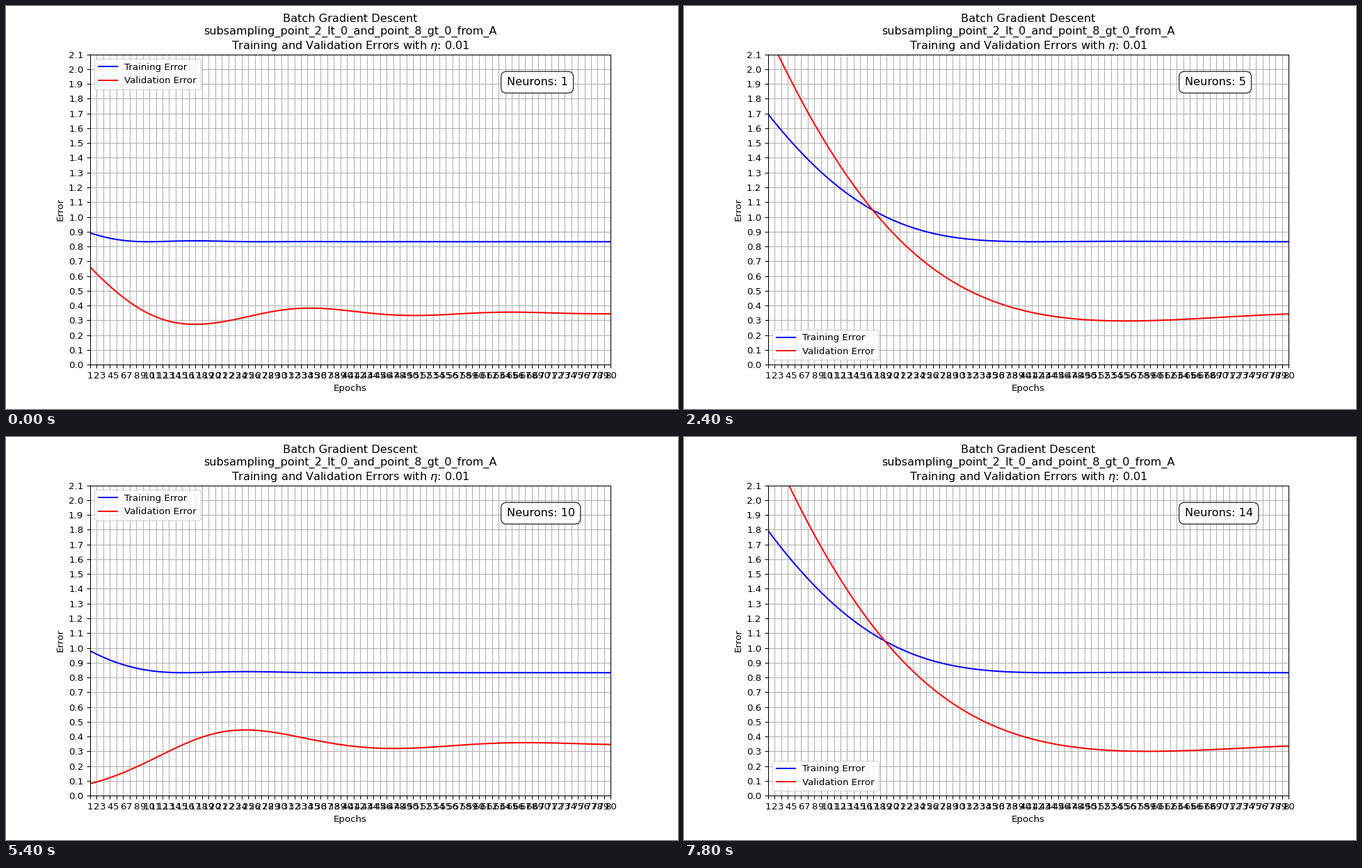
A matplotlib script for the animation above (8 s loop, 966x580 px).

```python
import matplotlib.pyplot as plt
import numpy as np
from matplotlib.animation import FuncAnimation

WIDTH, HEIGHT, DPI = 966, 580, 96.6
EPOCHS = np.arange(1, 81)
STEP_MS, TICK_MS, LOOP_MS = 600, 200, 8000
RATE, BETA1, BETA2 = 0.0305, 0.9, 0.999

# Initial weight offset of each run, for 1 to 14 neurons
OFFSETS = [0.245, 0.41, 0.95, 0.445, 0.93, 0.371, 0.37,
           0.429, 0.45, -0.385, 0.43, 0.467, 0.6, 0.981]


def descend(offset):
    """Offset per epoch under Adam steps on the loss offset**2 / 2."""
    path, m, v = [offset], 0.0, 0.0
    for t in range(1, len(EPOCHS)):
        m = BETA1 * m + (1 - BETA1) * offset
        v = BETA2 * v + (1 - BETA2) * offset**2
        m_hat, v_hat = m / (1 - BETA1**t), v / (1 - BETA2**t)
        offset -= RATE * m_hat / np.sqrt(v_hat)
        path.append(offset)
    return np.array(path)


def errors(offset):
    d = descend(offset)
    train = 0.832 + d**2
    valid = 0.348 + 1.04 * d + 0.95 * d**2 + 0.13 * d**3
    return train, valid


CURVES = [errors(offset) for offset in OFFSETS]

# The small margin keeps rounding from dropping a pixel
fig, ax = plt.subplots(figsize=((WIDTH + 0.01) / DPI, (HEIGHT + 0.01) / DPI), dpi=DPI)
train_line, = ax.plot([], [], color="blue", label="Training Error")
valid_line, = ax.plot([], [], color="red", label="Validation Error")
ax.set_xlim(1, 80)
ax.set_ylim(0, 2.1)
ax.set_xticks(EPOCHS)
ax.set_yticks(np.arange(22) / 10)
ax.grid(True)
ax.set_xlabel("Epochs")
ax.set_ylabel("Error")
ax.set_title("Batch Gradient Descent\n"
             "subsampling_point_2_lt_0_and_point_8_gt_0_from_A\n"
             r"Training and Validation Errors with $\eta$: 0.01")
legend = ax.legend(loc="upper left")
counter = ax.text(0.8, 0.9, "", transform=ax.transAxes, fontsize=12,
                  bbox=dict(boxstyle="round,pad=0.5", facecolor="white", alpha=0.8))


def update(frame):
    run = frame * TICK_MS // STEP_MS
    train, valid = CURVES[run]
    train_line.set_data(EPOCHS, train)
    valid_line.set_data(EPOCHS, valid)
    legend.set_loc("lower left" if valid[0] > 1.8 else "upper left")
    counter.set_text(f"Neurons: {run + 1}")
    return train_line, valid_line, legend, counter


anim = FuncAnimation(fig, update, frames=LOOP_MS // TICK_MS, interval=TICK_MS,
                     repeat=True, repeat_delay=0, blit=False)
plt.show()
```
